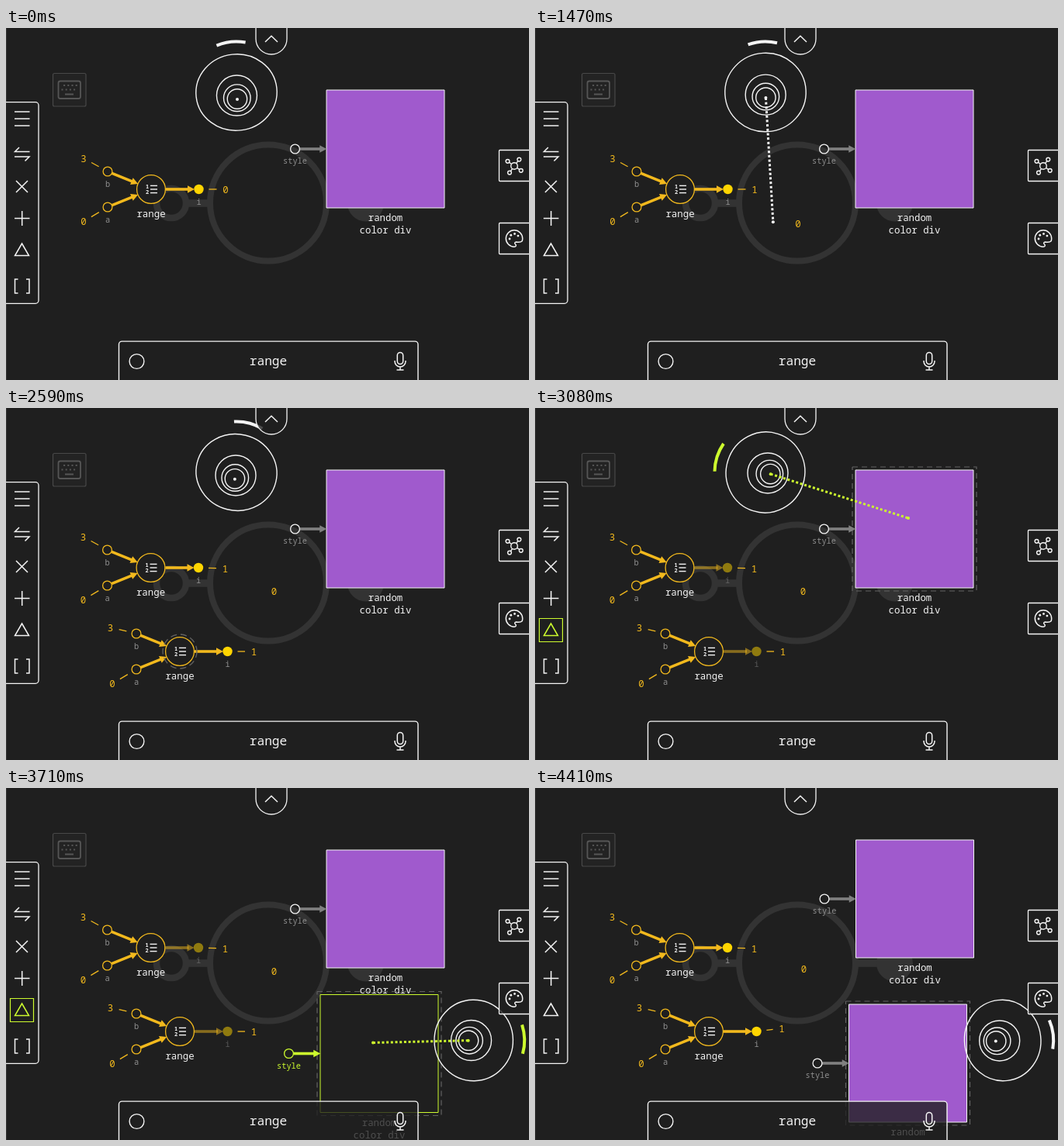
An HTML page with a canvas that plays this animation: 674 px wide and 454 px high, repeating every 4.55 s.

```html
<!DOCTYPE html>
<html lang="en">
<head>
<meta charset="utf-8">
<title>Node graph editor</title>
<style>
html, body { margin: 0; width: 100%; height: 100%; overflow: hidden; background: #1f1f1f; }
canvas { display: block; }
</style>
</head>
<body>
<canvas id="stage" width="674" height="454"></canvas>
<script>
const c = document.getElementById('stage').getContext('2d');
const LOOP = 4550, STEP = 70, TAU = Math.PI * 2;
const BG = '#1f1f1f', VEIL = 'rgba(31,31,31,0.78)', WHITE = '#f4f4f4', GREY = '#8f8f8f';
const GOLD = '#f2b91d', YELLOW = '#ffd500', LIME = '#cdfb2e', PURPLE = '#a05acd';
const DASH = '#626262', MARK = '#333', KEYS = '#565656';

// Moments of the story, in ms.
const REACH = 210, GRAB = 700, DROP = 1330, ARM = 1680, COPY = 2100, PLACE = 2590;
const REACH2 = 2660, ARM2 = 3010, COPY2 = 3150, PLACE2 = 4130, PUSH = 4060;

const span = (t, a, b) => Math.min(1, Math.max(0, (t - a) / (b - a)));
const smooth = (t, a, b) => { const k = span(t, a, b); return k * k * (3 - 2 * k); };
const mix = (a, b, k) => a + (b - a) * k;
const blend = (p, q, k) => [mix(p[0], q[0], k), mix(p[1], q[1], k)];
const add = (p, x, y) => [p[0] + x, p[1] + y];

function stroke(color, width) {
  c.strokeStyle = color;
  c.lineWidth = width;
  c.stroke();
}

function line(color, width, ...pts) {
  c.beginPath();
  pts.forEach(p => c.lineTo(...p));
  stroke(color, width);
}

function icon(path, color = WHITE) {
  c.strokeStyle = color;
  c.lineWidth = 1.5;
  c.stroke(new Path2D(path));
}

function paint(color, width, fill) {
  if (fill) { c.fillStyle = fill; c.fill(); }
  if (width) stroke(color, width);
}

function ring(x, y, r, color, width, fill) {
  c.beginPath();
  c.arc(x, y, r, 0, TAU);
  paint(color, width, fill);
}

const dot = (x, y, r, color) => ring(x, y, r, color, 0, color);

function box(x, y, w, h, r, color, width, fill) {
  c.beginPath();
  c.roundRect(x, y, w, h, r);
  paint(color, width, fill);
}

function dashed(pattern, draw) {
  c.setLineDash(pattern);
  draw();
  c.setLineDash([]);
}

function text(s, x, y, size, color, weight = '') {
  c.font = `${weight} ${size}px "Noto Sans Mono", "DejaVu Sans Mono", monospace`;
  c.textAlign = 'center';
  c.fillStyle = color;
  c.fillText(s, x, y);
}

function arrow(x0, y0, x1, y1, color) {
  const len = Math.hypot(x1 - x0, y1 - y0);
  c.save();
  c.translate(x0, y0);
  c.rotate(Math.atan2(y1 - y0, x1 - x0));
  line(color, 3.6, [0, 0], [len - 7, 0]);
  c.fillStyle = color;
  c.fill(new Path2D(`M${len} 0l-9 -4.8v9.6z`));
  c.restore();
}

const datum = (s, [x, y]) => text(s, x, y + 4.5, 12.4, GOLD);

// Thin connection from a pin to its value.
function link(pin, value) {
  const d = Math.hypot(value[0] - pin[0], value[1] - pin[1]);
  line(GOLD, 1.3, blend(pin, value, 13 / d), blend(pin, value, 1 - 11.5 / d));
}

function rangeNode([x, y], o) {
  const main = o.lime ? LIME : GOLD;
  [['b', -23, o.three, '3'], ['a', 23, o.zero, '0']].forEach(([name, dy, offset, s]) => {
    const pin = [x - 56, y + dy], value = add(offset, x, y);
    link(pin, value);
    datum(s, value);
    ring(...pin, 5.9, main, 1.3);
    arrow(...blend(pin, [x, y], 0.1), ...blend(pin, [x, y], 0.7), main);
    if (o.targets) dashed([5, 4.5], () => ring(...pin, 9.5, '#43a02f', 1.2));
    text(name, pin[0], pin[1] + 19.5, 10.4, o.lime ? LIME : GREY);
  });

  const pin = [x + 61.5, y];
  c.globalAlpha = o.dim ? 0.5 : 1;
  arrow(x + 19, y, x + 56, y, GOLD);
  dot(...pin, 6.2, YELLOW);
  text('i', pin[0], y + 19.5, 10.4, GREY);
  c.globalAlpha = 1;
  link(pin, o.out);
  if (o.value) datum(o.value, o.out);

  ring(x, y, 18.4, main, 1.3, BG);
  if (o.hover) dashed([8, 5], () => ring(x, y, 22, DASH, 1.3));
  [-1, 0, 1].forEach(i => line(WHITE, 1.4, [x - 1, y + i * 4.6], [x + 8, y + i * 4.6]));
  text('1', x - 4.8, y - 0.6, 7, WHITE, 'bold');
  text('2', x - 4.8, y + 6.2, 7, WHITE, 'bold');
  text('range', x, y + 35.5, 12.4, WHITE);
}

function divNode([x, y], o) {
  const edge = o.lime ? LIME : WHITE, wire = o.lime ? LIME : '#808080';
  const pin = [x - 40.5, y + 76 + (o.lag || 0)], mid = [x + 76, y + 76];
  box(x, y, 152, 152, 0, edge, 1, o.lime ? null : PURPLE);
  if (o.hover) dashed([7, 5], () => box(x - 4, y - 4, 160, 160, 0, DASH, 1.2));
  arrow(...blend(pin, mid, 0.05), ...blend(pin, mid, 0.35), wire);
  ring(...pin, 5.9, edge, 1.3);
  text('style', pin[0], pin[1] + 19, 10.3, o.lime ? LIME : GREY);
  text('random', mid[0], y + 169, 12.4, WHITE);
  text('color div', mid[0], y + 185, 12.4, WHITE);
}

// The knob leans towards the tip, and the arc sits on the opposite side.
function joystick(center, tip, reach, color) {
  const back = Math.atan2(center[1] - tip[1], center[0] - tip[0]);
  const lean = mix(9, 7, reach);
  const knob = add(center, -Math.cos(back) * lean, -Math.sin(back) * lean);
  c.beginPath();
  c.ellipse(...center, mix(49.2, 50.7, reach), 52.2, back, 0, TAU);
  stroke(WHITE, 1.4);
  [[0.45, 26], [0.8, 17.3], [0.95, 12.7]].forEach(([k, r]) =>
    ring(...blend(center, knob, k), r, WHITE, 1.4));
  c.beginPath();
  c.arc(...center, 65.5, back - 0.29, back + 0.29);
  stroke(color, 4);
  dot(...knob, 2, color);
  if (reach) {
    const end = blend(knob, tip, reach);
    dashed([3, 2.7], () => line(color, 3, knob, end));
    dot(...end, 2, color);
  }
}

function backdrop() {
  c.fillStyle = BG;
  c.fillRect(0, 0, 674, 454);
  c.fillStyle = '#363636';
  c.fillRect(0, 0, 1, 454);
  ring(338, 225.5, 75, MARK, 8);
  ring(213, 226, 19, MARK, 8.5);
  line(MARK, 9.5, [234, 226], [261, 226]);
  line(MARK, 9.5, [415, 226], [442, 226]);
  dot(463.5, 226, 23.5, MARK);

  box(60.5, 58.5, 42.5, 42.5, 2, '#484848', 1.2, '#232323');
  box(67.5, 68.5, 28.5, 22.5, 2.5, KEYS, 1.8);
  c.fillStyle = KEYS;
  for (let i = 0; i < 8; i++) c.fillRect(71.5 + 2.6 * i, 78.5 - 5.5 * (i % 2), 2, 2);
  c.fillRect(76, 84.5, 11, 2);
}

function leftMenu(mode) {
  box(-4, 95.7, 46, 259.6, 4, WHITE, 1.3, VEIL);
  icon('M11 108h19.5m-19.5 9h19.5m-19.5 9h19.5');
  icon('M30.5 159.5h-19l5.5 -5.5M11 166h19l-5.5 5.5');
  icon('M13 197l15 15m0 -15l-15 15');
  icon('M11 245.5h19.5M20.7 236v19');
  icon('M20.5 278l9 15.5h-18z', mode ? LIME : WHITE);
  if (mode) box(5.5, 271.5, 30, 30, 0, LIME, 1.2);
  icon('M15.5 324h-4v18h4m10.5 -18h4v18h-4');
}

function rightMenu() {
  [157.5, 251.5].forEach(y => box(635.5, y, 44, 40, 1, WHITE, 1.3, VEIL));
  const polar = (x, y, r, deg) => add([x, y], r * Math.cos(deg * TAU / 360), r * Math.sin(deg * TAU / 360));

  for (let i = 0; i < 4; i++) {
    const end = polar(655, 178, 10.5, 34 + 91 * i);
    line(WHITE, 1.4, [655, 178], end);
    ring(...end, 2.4, WHITE, 1.4, BG);
  }
  ring(655, 178, 4.3, WHITE, 1.4, BG);

  c.beginPath();
  c.arc(655, 271.5, 10.7, TAU / 4, TAU * 1.05);
  c.quadraticCurveTo(663, 277, 657.5, 276);
  c.quadraticCurveTo(654, 277, 657, 279.5);
  c.quadraticCurveTo(658, 282, 655, 282.2);
  stroke(WHITE, 1.5);
  for (let i = 0; i < 4; i++) dot(...polar(655, 271.5, 6, 175 + 50 * i), 1.4, WHITE);
}

function bars() {
  box(322, -8, 40, 42, [0, 0, 20, 20], WHITE, 1.3, VEIL);
  icon('M334 18l8 -7.7l8 7.7');

  box(145.5, 404.1, 385.5, 60, 4, WHITE, 1.4, VEIL);
  ring(168.5, 430, 9.4, WHITE, 1.4);
  text('range', 338, 435, 16.2, WHITE);
  box(504.3, 418.5, 7.4, 15, 3.7, WHITE, 1.5);
  icon('M501 429v1a7 7 0 0 0 14 0v-1M508 437v4m-4.5 0h9');
}

function scene(t) {
  const within = (a, b) => t >= a && t < b;
  const copyRange = within(ARM, PLACE), copyDiv = within(ARM2, PLACE2), mode = copyRange || copyDiv;
  const held = t < DROP, cloned = t >= COPY;
  const haul = span(t, GRAB, 1190), settle = smooth(t, COPY, 2520);
  const fall = span(t, COPY2, 3660), push = smooth(t, PUSH, 4410);

  // Positions of everything that can be dragged or pushed aside.
  const dropped = [mix(283, 339, haul), mix(208, 252, haul ** 1.5)];
  const zero = add(dropped, 6.5 * settle + push, -16 * settle - 2.5 * push);
  const range = [187 - settle / 2, 208 - 2 * settle];
  const rangeCopy = blend([187, 208], [224, 314], settle);
  const div = [413 + push / 2, 80 - 13 * push];
  const divCopy = [413 - 8 * fall ** 4 - push / 2, 80 + 186.5 * fall + 12.5 * push];

  backdrop();

  const shift = cloned ? 3 * (settle - 1) : 0;
  rangeNode(range, {
    three: [-87 + shift, -40], zero: [-87 + shift, 41.5],
    out: held ? zero : add(range, 96 + shift / 2, settle),
    value: held ? '' : '1',
    targets: within(770, DROP), dim: copyDiv,
    lime: copyRange && !cloned, hover: within(1610, COPY)
  });
  if (cloned) rangeNode(rangeCopy, {
    three: [-87 - 2.5 * settle, -40 + 9 * settle], zero: [-87, 41.5],
    out: add(rangeCopy, 98 - 2.5 * settle - 1.5 * push, -4 * push),
    value: '1', dim: copyDiv, lime: copyRange, hover: t < 2800
  });
  datum('0', zero);
  if (within(560, DROP)) {
    dashed([8, 6], () => box(zero[0] - 7, zero[1] - 14, 14, 28, 0, '#707070', 1.2));
  }

  divNode(div, { hover: within(2870, COPY2) });
  if (t >= COPY2) {
    divNode(divCopy, { lime: copyDiv, lag: -31 * Math.sin(Math.PI * fall), hover: true });
  }

  // The tip visits each grabbed item in turn.
  let tip = blend([311, 208], add(zero, -5, 3), span(t, REACH, 490));
  tip = blend(tip, add(rangeCopy, 10, 23), smooth(t, DROP, 1820));
  tip = blend(tip, add(divCopy, 68, 62), smooth(t, PLACE, 2940));
  const reach = t < PLACE ? span(t, REACH, 490) : t < PLACE2 ? span(t, REACH2, 2940) : 0;
  joystick(t < COPY2 ? [297, 83] : [602.7, 325.5], tip, reach, mode ? LIME : WHITE);

  leftMenu(mode);
  rightMenu();
  bars();
}

const start = performance.now();
function frame() {
  const t = (performance.now() - start) % LOOP;
  scene(Math.min(Math.floor(t / STEP) * STEP, 4410));
  requestAnimationFrame(frame);
}
frame();
</script>
</body>
</html>
```
